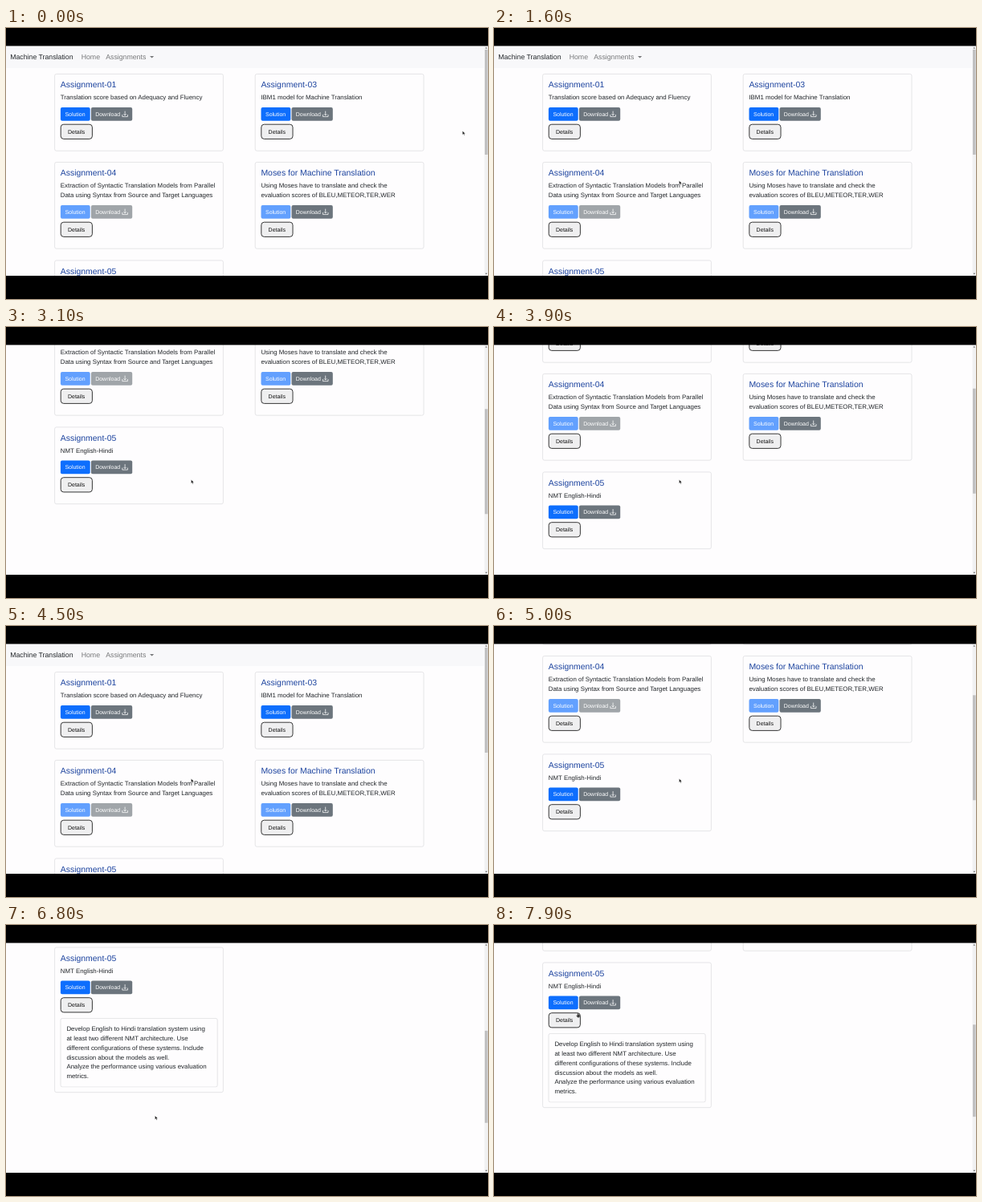
Write an HTML page that moves like this. It is 600 by 338 pixels and loops after 8 s.

```html
<!DOCTYPE html>
<html lang="en">
<head>
<meta charset="utf-8">
<title>Machine Translation</title>
<style>
html, body { margin: 0; width: 100%; height: 100%; overflow: hidden; background: #000; }
svg { display: block; }
text { font: 7.88px "Liberation Sans", Arial, sans-serif; fill: #212529; text-rendering: geometricPrecision; white-space: pre; }
.nav { font-size: 8.75px; }
.muted { fill: #767779; }
.title { font-size: 10.45px; fill: #1d449f; }
.btn { font-size: 6.98px; fill: #fff; }
.dark { fill: #111; }
.card { fill: #fefdfe; stroke: #dfdfe1; stroke-width: .8; }
.details { fill: #efeff0; stroke: #222; stroke-width: .9; }
.icon { fill: none; stroke: #fff; stroke-width: .75; }
</style>
</head>
<body>
<svg id="stage" width="600" height="338" viewBox="0 0 600 338"></svg>
<script>
const LOOP = 8000, STEP = 100, VIEW = 287, PAGE = 607, FOLD = 85, LINE = 11.9;

const rect = (x, y, w, h, attrs) => `<rect x="${x}" y="${y}" width="${w}" height="${h}" ${attrs}/>`;
const text = (x, y, str, cls = '') => `<text x="${x}" y="${y}" class="${cls}">${str}</text>`;
const paragraph = (x, y, lines) => lines.map((s, i) => text(x, y + i * LINE, s)).join('');

function card(x, y, title, lines, { solution = true, download = true, id = '' } = {}) {
  const extra = (lines.length - 1) * 12;
  const top = y + 42 + extra;
  return rect(x + .4, y + .4, 209.8, 95.8 + extra, `rx="2.2" class="card" id="${id}"`) +
    text(x + 7.6, y + 17.3, title, 'title') +
    paragraph(x + 7.6, y + 32, lines) +
    rect(x + 7.7, top, 36.8, 16.8, `rx="2" fill="${solution ? '#0d6efd' : '#62a0fe'}"`) +
    text(x + 13.2, top + 10.8, 'Solution', 'btn') +
    rect(x + 45.7, top, 51.3, 16.8, `rx="2" fill="${download ? '#6c757d' : '#a0a5a9'}"`) +
    text(x + 51, top + 10.8, 'Download', 'btn') +
    `<path class="icon" d="M${x + 84.6} ${top + 9}v2.6h6.6v-2.6m-3.3-4.4v5.4m-1.6-1.6l1.6 1.6l1.6-1.6"/>` +
    rect(x + 8, top + 21.2, 39.2, 18.2, 'rx="3.6" class="details"') +
    text(x + 16.8, top + 32.7, 'Details', 'btn dark');
}

const L = 60.2, R = 309.8;
stage.innerHTML =
  rect(0, 22, 600, VIEW, 'fill="#fefdfe"') +
  '<g id="page">' +
    rect(0, 22, 595.5, 28, 'fill="#f8f8fa"') +
    text(5.2, 39.2, 'Machine Translation', 'nav') +
    text(93.7, 39.2, 'Home', 'nav muted') +
    text(124.2, 39.2, 'Assignments', 'nav muted') +
    '<path d="M179 34.9h5.2l-2.6 2.7z" fill="#767779"/>' +
    card(L, 57, 'Assignment-01', ['Translation score based on Adequacy and Fluency']) +
    card(R, 57, 'Assignment-03', ['IBM1 model for Machine Translation']) +
    card(L, 167, 'Assignment-04',
      ['Extraction of Syntactic Translation Models from Parallel',
       'Data using Syntax from Source and Target Languages'], { solution: false, download: false }) +
    card(R, 167, 'Moses for Machine Translation',
      ['Using Moses have to translate and check the',
       'evaluation scores of BLEU,METEOR,TER,WER'], { solution: false }) +
    card(L, 289.5, 'Assignment-05', ['NMT English-Hindi'], { id: 'last' }) +
    `<svg id="fold" x="${L}" y="377.5" width="210" height="0" overflow="hidden">` +
      rect(7.8, .9, 195.2, 85.6, 'rx="2.2" class="card"') +
      paragraph(15.2, 16.3, [
        'Develop English to Hindi translation system using',
        'at least two different NMT architecture. Use',
        'different configurations of these systems. Include',
        'discussion about the models as well.',
        'Analyze the performance using various evaluation',
        'metrics.']) +
    '</svg>' +
  '</g>' +
  rect(595.5, 22, 4.5, VIEW, 'fill="#f1f1f2"') +
  '<path d="M596.6 25.6h2.4l-1.2-1.6zM596.6 305.8h2.4l-1.2 1.6z" fill="#555"/>' +
  rect(596, 27, 3.6, 131, 'id="thumb" fill="#c1c1c2"') +
  '<g id="arrow"><path d="M0 0v4.6l1.1-1l.8 1.7l.8-.4l-.8-1.6h1.5z" fill="#111" stroke="#fff" stroke-width=".3"/></g>' +
  '<g id="hand"><path d="M-.4 0h.9v1.8l2 .5v2l-.6 1.2h-2.2l-1.4-2.2l.6-.4l.7.6z" fill="#333" stroke="#777" stroke-width=".4"/></g>' +
  rect(0, 0, 600, 22.4, 'fill="#000"') +
  rect(0, 309, 600, 29, 'fill="#000"');

// Each key is [time, value, ...]
const scrollKeys = [[0, 0], [2100, 0], [2600, 70], [3000, 150], [3400, 210], [3900, 109],
  [4400, 0], [4500, 0], [4800, 86], [5000, 130], [5500, 190], [6500, 190], [6800, 262], [7100, 262], [7400, 243]];
const cursorKeys = [[0, 568.3, 128.5], [50, 568.3, 128.5], [300, 230.5, 190.5], [5600, 230.5, 190.5],
  [6000, 98, 172], [6200, 98, 172], [6500, 185.5, 238], [7400, 185.5, 238], [7900, 104.3, 109.7]];
const foldKeys = [[0, 0], [6100, 0], [6450, 1]];

function at(keys, t) {
  const i = keys.findIndex(k => k[0] > t);
  if (i < 0) return keys[keys.length - 1].slice(1);
  const [a, b] = [keys[i - 1], keys[i]];
  const p = (t - a[0]) / (b[0] - a[0]);
  return a.slice(1).map((v, j) => v + (b[j + 1] - v) * p);
}

function draw(now) {
  const t = Math.floor(now % LOOP / STEP) * STEP;
  const [scroll] = at(scrollKeys, t), [x, y] = at(cursorKeys, t), [p] = at(foldKeys, t);
  const open = FOLD * p * p * (3 - 2 * p);
  const ratio = 277 / (PAGE + open);
  page.setAttribute('transform', `translate(0 ${-scroll})`);
  last.setAttribute('height', 95.8 + open);
  fold.setAttribute('height', open ? open + 2 : 0);
  thumb.setAttribute('y', 27 + scroll * ratio);
  thumb.setAttribute('height', VIEW * ratio);
  const pointing = t >= 6000 && t <= 6200 || t >= 7900;
  for (const [el, shown] of [[arrow, !pointing], [hand, pointing]]) {
    el.setAttribute('transform', `translate(${x} ${y})`);
    el.style.display = shown ? '' : 'none';
  }
  requestAnimationFrame(() => draw(performance.now() - start));
}

const start = performance.now();
draw(0);
</script>
</body>
</html>
```
